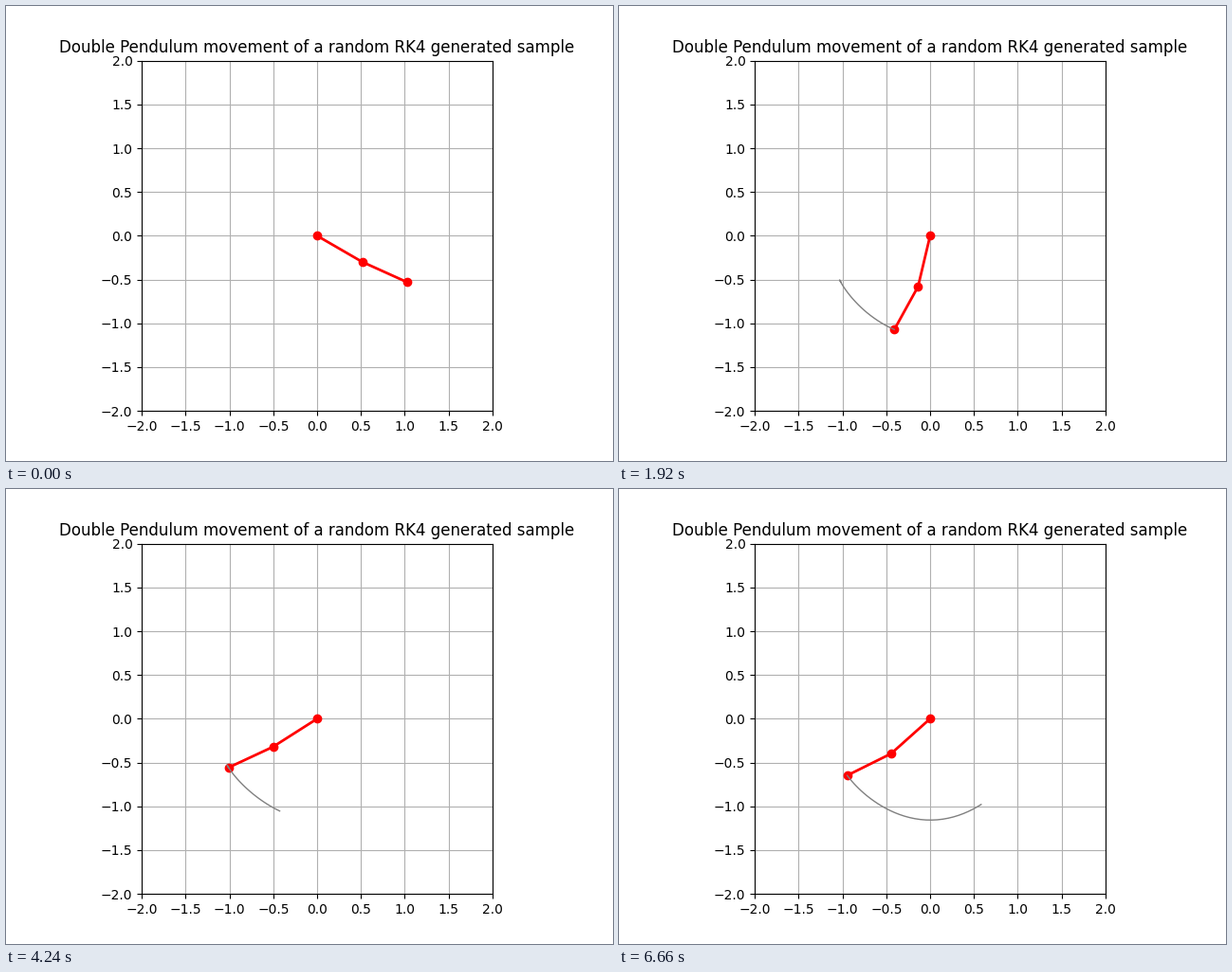
Recreate the animation shown at these times as a matplotlib script. Size 640 by 480 pixels, loop 6680 ms.

```python
import matplotlib.pyplot as plt
import numpy as np
from matplotlib.animation import FuncAnimation

STEPS, TRAIL = 334, 33
G, L1, L2 = 9.81, 0.596, 0.5605

# step: rod angles from the vertical, in degrees
KEYS = {0: (58.7, 65.9), 58: (-49.3, -68.8), 132: (56.7, 67.2), 179: (-11.6, -32.3),
        242: (3.1, 3.3), 281: (56.7, 69.2), 333: (-48.2, -63.9)}


def derivs(state, mu):
    """Double pendulum equations, mu = lower mass / upper mass."""
    th1, th2, w1, w2 = state
    s, c = np.sin(th1 - th2), np.cos(th1 - th2)
    g1, g2 = G * np.sin(th1), G * np.sin(th2)
    f1, f2 = L1 * w1 * w1 * s, mu * L2 * w2 * w2 * s
    total, den = 1 + mu, 1 + mu * s * s
    a1 = (mu * c * (g2 - f1) - f2 - total * g1) / (L1 * den)
    a2 = (total * (f1 - g2 + c * g1) + f2 * c) / (L2 * den)
    return np.array([w1, w2, a1, a2])


def swing(params):
    """RK4 rod angles, shape (STEPS, 2, k).

    Each column holds two start angles, two start speeds, log mass ratio, time step.
    """
    state, mu, dt = params[:4], np.exp(params[4]), params[5]
    angles = np.empty((STEPS, 2, params.shape[1]))
    for i in range(STEPS):
        angles[i] = state[:2]
        k1 = derivs(state, mu)
        k2 = derivs(state + dt / 2 * k1, mu)
        k3 = derivs(state + dt / 2 * k2, mu)
        k4 = derivs(state + dt * k3, mu)
        state = state + dt / 6 * (k1 + 2 * k2 + 2 * k3 + k4)
    return angles


def joints(angles):
    """Elbow and tip positions: x1, y1, x2, y2 along axis 1."""
    x1, y1 = L1 * np.sin(angles[:, 0]), -L1 * np.cos(angles[:, 0])
    x2, y2 = x1 + L2 * np.sin(angles[:, 1]), y1 - L2 * np.cos(angles[:, 1])
    return np.stack([x1, y1, x2, y2], axis=1)


def find_motion(rounds=16, size=1000, keep=70):
    """Cross-entropy search for the swing that passes through the key poses."""
    rng = np.random.default_rng(4)
    goal = joints(np.radians(list(KEYS.values())))[..., None]
    mean = np.array([*np.radians(KEYS[0]), 0, 0, 0, 0.0152])
    spread = np.diag([0.015, 0.015, 0.5, 0.5, 0.8, 0.0008])
    for _ in range(rounds):
        trial = mean[:, None] + spread @ rng.standard_normal((6, size))
        miss = joints(swing(trial)[list(KEYS)]) - goal
        elite = trial[:, np.argsort((miss ** 2).sum(axis=(0, 1)))[:keep]]
        mean = elite.mean(axis=1)
        spread = np.linalg.cholesky(np.cov(elite) + 1e-16 * np.eye(6))
    return mean


x1, y1, x2, y2 = joints(swing(find_motion()[:, None]))[..., 0].T

fig, ax = plt.subplots(figsize=(6.4, 4.8), dpi=100)
ax.set(xlim=(-2, 2), ylim=(-2, 2), aspect="equal")
ax.set_title("Double Pendulum movement of a random RK4 generated sample")
ax.grid()
rods, = ax.plot([], [], "o-", lw=2, color="red")
trail, = ax.plot([], [], "-", lw=1, color="gray")


def update(i):
    start = max(0, i - TRAIL)
    rods.set_data([0, x1[i], x2[i]], [0, y1[i], y2[i]])
    trail.set_data(x2[start:i + 1], y2[start:i + 1])
    return rods, trail


anim = FuncAnimation(fig, update, frames=STEPS, interval=20, repeat=True, repeat_delay=0)
plt.show()
```
